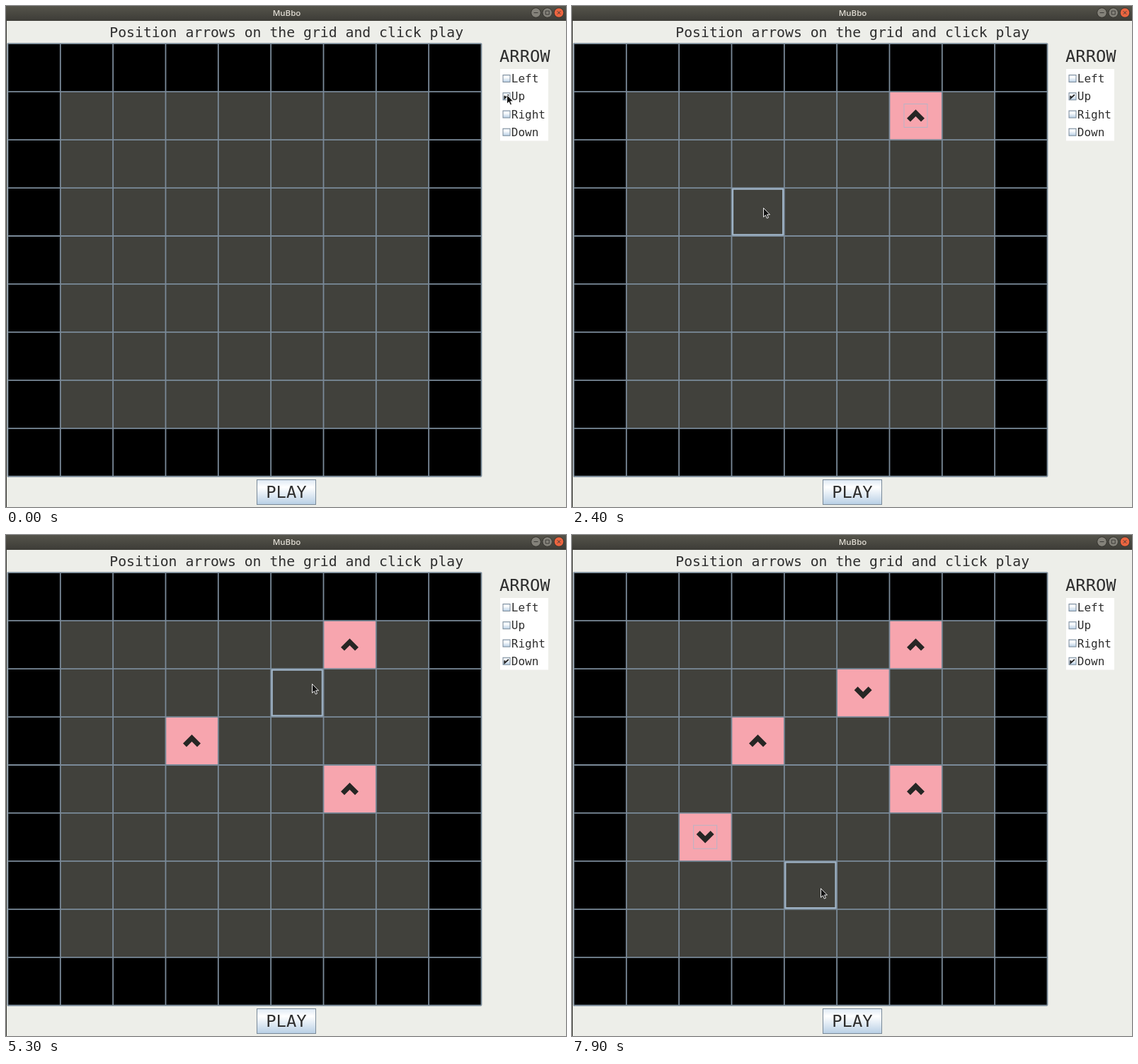
Animation, 791 px wide and 708 px high, one loop 8 s. Source, as an HTML page:

```html
<!DOCTYPE html>
<html lang="en">
<head>
<meta charset="utf-8">
<title>MuBbo</title>
<style>
  html, body { margin: 0; width: 100%; height: 100%; overflow: hidden; background: #edeee9; }
  svg { display: block; width: 791px; height: 708px; }
  text { font-family: "DejaVu Sans Mono", monospace; fill: #2e2e2e; }
  .title { font: 600 11.5px "Open Sans", sans-serif; fill: #dfdbd2; text-anchor: middle; }
  .chevron { fill: none; stroke: #262624; stroke-width: 7; }
  .ring { fill: none; stroke: #a3b8cc; stroke-opacity: .75; }
  .hover { fill: none; stroke: #a3b8cc; stroke-width: 2; }
  .line { stroke: #7a8a99; stroke-width: 1.8; }
  .icon { fill: none; stroke: #3c3b37; }
  .mark { fill: none; stroke: #222; stroke-width: 1.9; }
</style>
</head>
<body>
<svg viewBox="0 0 791 708">
  <defs>
    <linearGradient id="bar" x2="0" y2="1">
      <stop stop-color="#55544b"/><stop offset="1" stop-color="#3d3c37"/>
    </linearGradient>
    <linearGradient id="metal" x2="0" y2="1">
      <stop stop-color="#dde8f3"/><stop offset=".3" stop-color="#fff"/>
      <stop offset="1" stop-color="#b8cfe5"/>
    </linearGradient>
  </defs>
  <rect width="791" height="708" fill="#edeee9"/>
  <rect y="21" width="1" height="687" fill="#33322e"/>
  <rect width="791" height="21" fill="url(#bar)"/>
  <text class="title" x="396.5" y="13.5">MuBbo</text>
  <g stroke="#35342f">
    <circle cx="748.5" cy="9.5" r="6.8" fill="#84827a"/>
    <circle cx="764.7" cy="9.5" r="6.8" fill="#84827a"/>
    <circle cx="781" cy="9.5" r="6.8" fill="#ec6540"/>
  </g>
  <path class="icon" d="M745.5 9.5h6M762.2 7h5v5h-5zM778.8 7.3l4.4 4.4m0-4.4l-4.4 4.4"/>
  <text x="146.3" y="44" font-size="19.77">Position arrows on the grid and click play</text>
  <text x="697" y="79" font-size="23.8">ARROW</text>
  <rect x="698" y="89" width="68" height="101.5" fill="#fff"/>
  <g id="options"></g>
  <rect x="354.5" y="669.5" width="83" height="35" fill="url(#metal)" stroke="#7a8a99"/>
  <text x="367.3" y="695" font-size="23.8">PLAY</text>
  <g id="grid"></g>
  <path id="cursor" fill="#111" stroke="#fff" stroke-width=".9"
    d="M.5 .5V13.2L3.4 10.6L5.4 15L7.5 14L5.6 9.8H9.5Z"/>
</svg>
<script>
const LOOP = 8000, STEP = 100;
const COLS = 9, ROWS = 9, CELL_W = 74.33, CELL_H = 67.95;
const PINK = '#f7a5ae', PRESSED = '#b8cfe5', DARK = '#41413c';
const PRESS_DOWN = 4400, CHECK_DOWN = 4700;

// Each move slows down towards its end point.
const home = { x: 707, y: 125 };
const moves = [
  { start: 300, end: 1000, x: 483, y: 153 },
  { start: 1700, end: 2000, x: 298, y: 225 },
  { start: 2100, end: 2400, x: 270, y: 285 },
  { start: 2800, end: 3200, x: 491, y: 349 },
  { start: 3600, end: 4200, x: 702, y: 176 },
  { start: 5000, end: 5300, x: 432, y: 210 },
  { start: 6400, end: 7100, x: 170, y: 446 },
  { start: 7500, end: 7900, x: 351, y: 499 }
];

const arrows = [
  { col: 6, row: 1, up: 1, press: 1200, release: 1400 },
  { col: 3, row: 3, up: 1, press: 2700, release: 2800 },
  { col: 6, row: 4, up: 1, press: 3300, release: 3500 },
  { col: 5, row: 2, up: -1, press: 5600, release: 5800 },
  { col: 2, row: 5, up: -1, press: 7300, release: 7500 }
];

const cellX = col => 2.3 + CELL_W * col;
const cellY = row => 53 + CELL_H * row;
const byId = id => document.getElementById(id);
const easeOut = k => 1 - (1 - k) ** 3;
const show = (node, on) => node.setAttribute('visibility', on ? 'visible' : 'hidden');

function add(parent, tag, attrs, text = '') {
  const node = document.createElementNS('http://www.w3.org/2000/svg', tag);
  for (const name in attrs) node.setAttribute(name, attrs[name]);
  node.textContent = text;
  return parent.appendChild(node);
}

const options = ['Left', 'Up', 'Right', 'Down'].map((name, i) => {
  const y = 97 + 25.25 * i, g = byId('options');
  const box = add(g, 'rect', { x: 702, y: y + .5, width: 10, height: 10, stroke: '#7a8a99' });
  const mark = add(g, 'path', { class: 'mark', d: `M704.3 ${y + 4.5}v3.6l5.6-5` });
  add(g, 'text', { x: 713.8, y: y + 11, 'font-size': 16 }, name);
  return { box, mark };
});

const grid = byId('grid');
const block = (col, row, cols, rows, fill) => add(grid, 'rect', {
  x: cellX(col), y: cellY(row), width: cols * CELL_W, height: rows * CELL_H, fill
});

block(0, 0, COLS, ROWS, '#000');
block(1, 1, COLS - 2, ROWS - 2, DARK);
for (const a of arrows) a.tile = block(a.col, a.row, 1, 1, PRESSED);
for (let i = 0; i <= COLS; i++) {
  add(grid, 'path', { class: 'line', d: `M${cellX(i) + .2} 53V664.5M2 ${cellY(i) + .2}H671.5` });
}
const hover = add(grid, 'rect', { class: 'hover', width: 71, height: 64.6 });
for (const a of arrows) {
  const x = cellX(a.col) + 37.2, y = cellY(a.row) + 34;
  const foot = y + 6.2 * a.up, tip = y - 3.8 * a.up;
  a.icon = add(grid, 'path', {
    class: 'chevron', d: `M${x - 10} ${foot}L${x} ${tip}L${x + 10} ${foot}`
  });
  a.ring = add(grid, 'rect', { class: 'ring', x: x - 16.5, y: y - 16.5, width: 33, height: 33 });
}

function pointer(t) {
  let { x, y } = home;
  for (const move of moves) {
    if (t <= move.start) break;
    const k = easeOut(Math.min(1, (t - move.start) / (move.end - move.start)));
    x += (move.x - x) * k;
    y += (move.y - y) * k;
  }
  return { x, y };
}

function drawPointer(t) {
  const { x, y } = pointer(t);
  byId('cursor').setAttribute('transform', `translate(${x} ${y})`);
  const col = Math.floor((x - cellX(0)) / CELL_W);
  const row = Math.floor((y - cellY(0)) / CELL_H);
  show(hover, col < COLS && row < ROWS);
  hover.setAttribute('x', cellX(col) + 1.8);
  hover.setAttribute('y', cellY(row) + 1.8);
}

function drawArrows(t) {
  const focused = arrows.filter(a => a.release <= t).pop();
  for (const a of arrows) {
    const placed = t >= a.release;
    const lostFocus = a.release < CHECK_DOWN && t >= CHECK_DOWN;
    show(a.tile, t >= a.press);
    a.tile.setAttribute('fill', placed ? PINK : PRESSED);
    show(a.icon, placed);
    show(a.ring, a === focused && !lostFocus);
  }
}

function drawOptions(t) {
  const checked = t < CHECK_DOWN ? 1 : 3;
  const pressed = t >= PRESS_DOWN && t < CHECK_DOWN ? 3 : -1;
  options.forEach(({ box, mark }, i) => {
    show(mark, i === checked);
    box.setAttribute('fill', i === pressed ? PRESSED : 'url(#metal)');
  });
}

const begin = performance.now();
function tick() {
  const elapsed = (performance.now() - begin) % LOOP;
  const t = Math.floor(elapsed / STEP) * STEP;
  drawPointer(t);
  drawArrows(t);
  drawOptions(t);
  requestAnimationFrame(tick);
}
tick();
</script>
</body>
</html>
```
